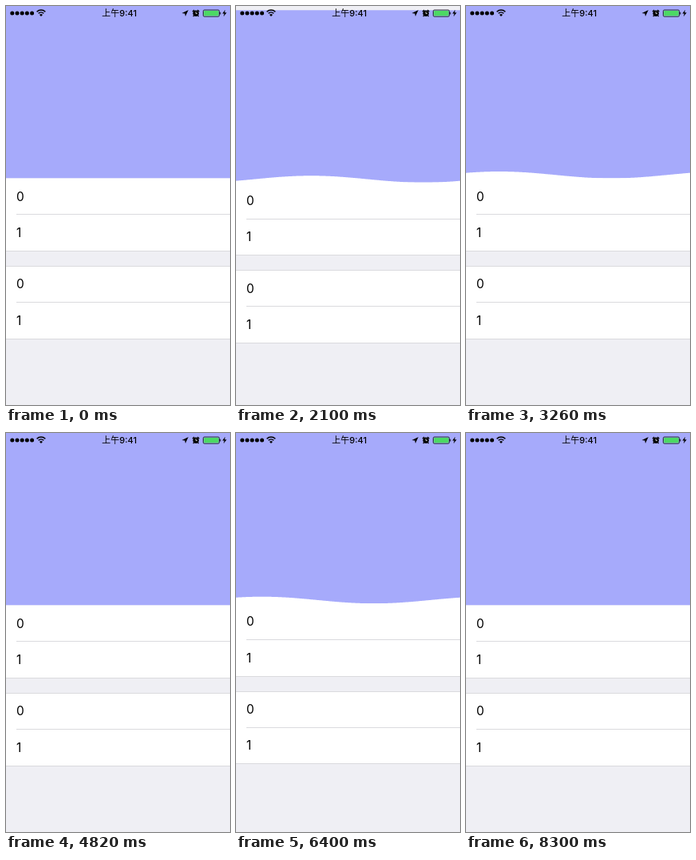
These frames come from a looping animation (281x499 px, 8.42 s). An HTML page with a canvas:

```html
<!DOCTYPE html>
<html lang="zh">
<head>
<meta charset="utf-8">
<title>Wave header</title>
<style>
html, body { margin: 0; width: 100%; height: 100%; overflow: hidden; background: #efeff4; }
canvas { display: block; width: 281px; height: 499px; }
</style>
</head>
<body>
<canvas id="stage"></canvas>
<script>
const W = 281, H = 499, LOOP = 8420;
const HEADER = 215.5, ROW = 45.4, GAP = 19;
const GREY = '#efeff4', BLUE = '#a6aafb', LINE = '#dadade', GREEN = '#4cd964';
const WAVE_MS = 1710, WAVE_HEIGHT = 8.5, WAVE_SPEED = 0.772;

const pulls = [
  { start: 800, settle: 1180, release: 1900, distance: 18.5 },
  { start: 5180, settle: 5520, release: 6120, distance: -17 }
];

const canvas = document.getElementById('stage');
const ctx = canvas.getContext('2d');
const ratio = window.devicePixelRatio || 1;
canvas.width = Math.round(W * ratio);
canvas.height = Math.round(H * ratio);
ctx.scale(canvas.width / W, canvas.height / H);

function smooth(u) {
  u = Math.min(1, Math.max(0, u));
  return u * u * (3 - 2 * u);
}

// Critically damped return to rest.
function spring(ms) {
  const u = 0.0125 * ms;
  return (1 + u) * Math.exp(-u);
}

function scrollOffset(t) {
  let offset = 0;
  for (const p of pulls) {
    if (t < p.start) continue;
    offset = p.distance * (t < p.release
      ? smooth((t - p.start) / (p.settle - p.start))
      : spring(t - p.release));
  }
  return Math.abs(offset) < 0.1 ? 0 : offset;
}

function rect(x, y, w, h, color) {
  ctx.fillStyle = color;
  ctx.fillRect(x, y, w, h);
}

function polygon(points) {
  ctx.beginPath();
  points.forEach(([x, y]) => ctx.lineTo(x, y));
  ctx.closePath();
  ctx.fill();
}

function disc(x, y, r) {
  ctx.beginPath();
  ctx.arc(x, y, r, 0, 2 * Math.PI);
  ctx.fill();
}

function stroke(points) {
  ctx.beginPath();
  points.forEach(([x, y]) => ctx.lineTo(x, y));
  ctx.stroke();
}

function drawWave(base, elapsed) {
  const crest = 95 - WAVE_SPEED * (elapsed - 200);
  ctx.fillStyle = '#fff';
  ctx.beginPath();
  ctx.moveTo(0, base + 1);
  for (let x = 0; x <= W; x++) {
    const rise = (1 + Math.cos(2 * Math.PI * (x - crest) / W)) / 2;
    ctx.lineTo(x, base - WAVE_HEIGHT * rise);
  }
  ctx.lineTo(W, base + 1);
  ctx.fill();
}

function drawSection(y) {
  rect(0, y, W, 2 * ROW, '#fff');
  rect(13, Math.round(y + ROW - 0.5), W - 13, 1, LINE);
  rect(0, Math.round(y + 2 * ROW - 0.5), W, 1, LINE);
  ctx.fillStyle = '#000';
  ctx.font = '400 15.5px Inter, Roboto, sans-serif';
  ctx.textAlign = 'left';
  ctx.textBaseline = 'alphabetic';
  ['0', '1'].forEach((label, i) => ctx.fillText(label, 13, y + i * ROW + 28));
}

function drawWifi() {
  ctx.lineWidth = 1.5;
  for (const r of [4.7, 7.6]) {
    ctx.beginPath();
    ctx.arc(44, 12.6, r, -Math.PI * 0.75, -Math.PI * 0.25);
    ctx.stroke();
  }
  ctx.beginPath();
  ctx.moveTo(44, 12.9);
  ctx.arc(44, 12.9, 2.8, -Math.PI * 0.75, -Math.PI * 0.25);
  ctx.fill();
}

function drawAlarm() {
  ctx.fillStyle = '#000';
  disc(238.2, 9.3, 3.7);
  ctx.lineWidth = 1.3;
  stroke([[234, 7], [236.2, 5.1]]);
  stroke([[240.2, 5.1], [242.4, 7]]);
  stroke([[235.6, 12], [234.8, 13.2]]);
  stroke([[240.8, 12], [241.6, 13.2]]);
  ctx.strokeStyle = '#fff';
  ctx.lineWidth = 0.7;
  stroke([[238.2, 7], [238.2, 9.5], [240, 9.5]]);
  ctx.strokeStyle = '#000';
}

function drawBattery() {
  ctx.lineWidth = 0.8;
  ctx.beginPath();
  ctx.roundRect(247.4, 5, 20.2, 8.2, 1.5);
  ctx.stroke();
  rect(248.3, 5.9, 18.4, 6.4, GREEN);
  rect(268.3, 7.7, 1, 2.8, '#000');
}

function drawStatusBar() {
  ctx.fillStyle = ctx.strokeStyle = '#000';
  for (let i = 0; i < 5; i++) disc(7.8 + 6.2 * i, 9.1, 2.5);
  drawWifi();
  ctx.font = '500 11px Inter, "Noto Sans CJK SC", "Noto Sans CJK", sans-serif';
  ctx.textAlign = 'center';
  ctx.textBaseline = 'alphabetic';
  ctx.fillText('上午9:41', 142.2, 13);
  polygon([[228.8, 5], [225, 13.1], [224.4, 9.5], [220.6, 8.9]]);
  drawAlarm();
  drawBattery();
  ctx.fillStyle = '#000';
  polygon([[275, 4.8], [271.4, 9.6], [273.8, 9.6], [272.9, 13.2], [276.8, 8.2], [274.3, 8.2]]);
}

function draw(t) {
  const offset = scrollOffset(t);
  const base = HEADER + offset;
  rect(0, 0, W, H, GREY);
  rect(0, offset, W, HEADER, BLUE);
  for (const p of pulls) {
    const elapsed = t - p.release;
    if (elapsed >= 0 && elapsed < WAVE_MS) drawWave(base, elapsed);
  }
  const second = base + 2 * ROW + GAP;
  drawSection(base);
  drawSection(second);
  rect(0, Math.round(second - 0.5), W, 1, LINE);
  drawStatusBar();
}

function frame() {
  draw(performance.now() % LOOP);
  requestAnimationFrame(frame);
}
frame();
</script>
</body>
</html>
```
